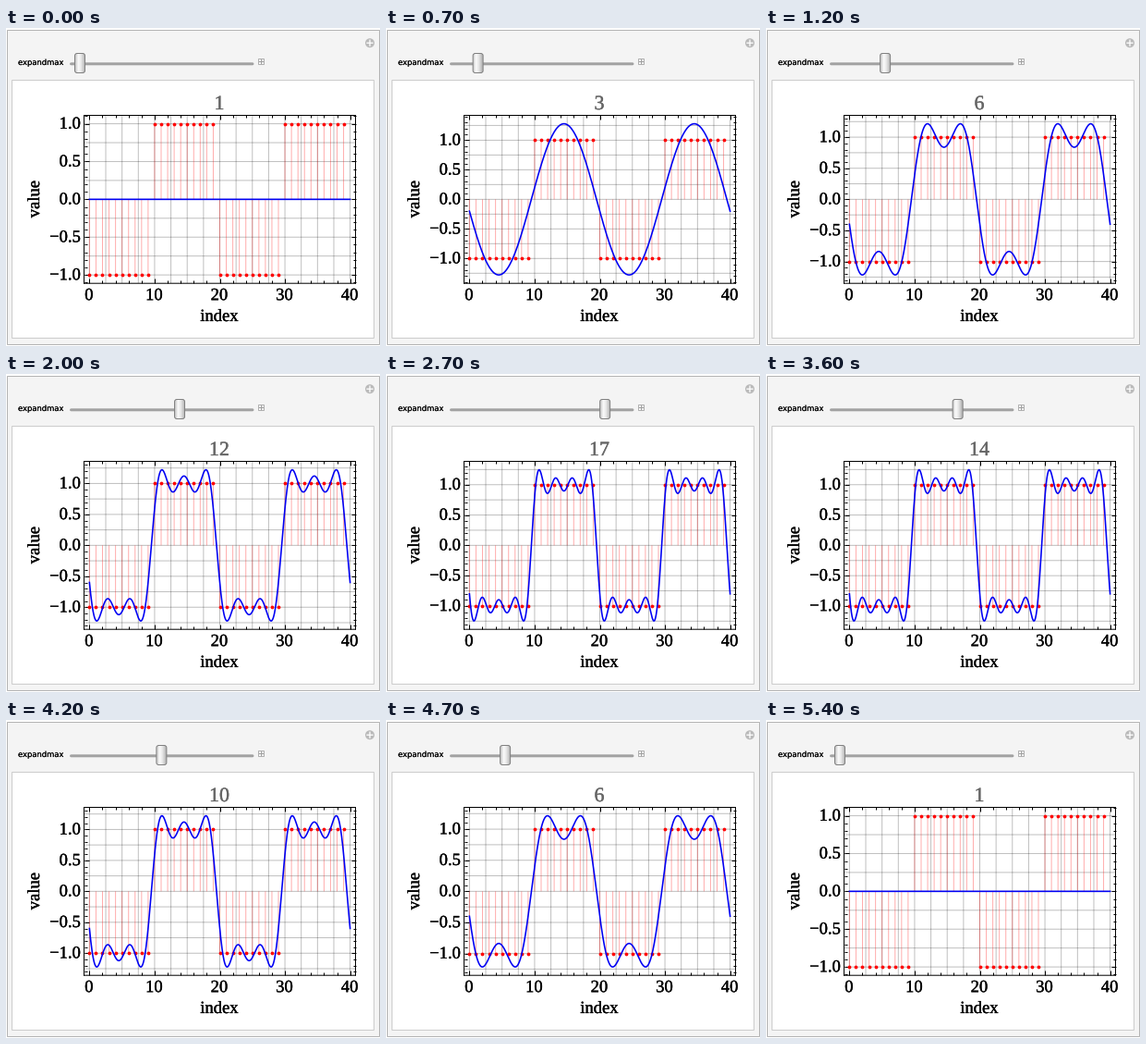
These frames come from a looping animation (405 by 344 pixels, 6000 ms). A matplotlib script:

```python
import numpy as np
import matplotlib.pyplot as plt
from matplotlib.animation import FuncAnimation
from matplotlib.patches import Circle, FancyBboxPatch, Rectangle
from matplotlib.patheffects import withStroke
from matplotlib.ticker import MultipleLocator

W, H, DPI = 405, 344, 100
FRAMES, INTERVAL = 60, 100
PX = 72 / DPI  # points per pixel
SERIF, SANS = "Liberation Serif", "DejaVu Sans"

plt.rcParams["path.snap"] = False
fig = plt.figure(figsize=(W / DPI, H / DPI), dpi=DPI, facecolor="white")
panel = fig.add_axes([0, 0, 1, 1])
panel.set(xlim=(0, W), ylim=(H, 0))
panel.axis("off")


def box(x0, y0, x1, y1, face, edge):
    panel.add_patch(Rectangle((x0, y0), x1 - x0, y1 - y0, fc=face, ec=edge, lw=PX))


def stroke(xs, ys, color, width=1, **kw):
    panel.plot(xs, ys, color=color, lw=width * PX, **kw)


def font(size, family=SERIF, color="black", weight=0.35):
    """Text style with slightly thickened strokes."""
    return dict(fontsize=size * PX, family=family, color=color, va="baseline",
                path_effects=[withStroke(linewidth=weight * PX, foreground=color)])


def plus(x, y, arm, color, width=1):
    stroke([x - arm, x + arm], [y, y], color, width)
    stroke([x, x], [y - arm, y + arm], color, width)


# Control panel
box(1.5, 2.5, 404.5, 342.5, "#f4f4f4", "#b4b4b4")
box(6.5, 56.5, 398.5, 335.5, "white", "#cccccc")
panel.add_patch(Circle((394, 16.2), 5, fc="#bababa", ec="none"))
plus(394, 16.2, 3, "white", 1.3)
panel.text(13, 40, "expandmax", **font(8.4, SANS, weight=0.1))
stroke([70.5, 267], [38.8, 38.8], "#a2a2a2", 3, solid_capstyle="round")
box(273.5, 33.5, 279.5, 39.5, "#f8f8f8", "#b0b0b0")
plus(276.5, 36.5, 2, "#a0a0a0")

# Slider thumb
thumb = FancyBboxPatch((0, 0), 1, 1, boxstyle="round,pad=0,rounding_size=2.5",
                       fc="none", ec="#808080", lw=PX, zorder=6)
panel.add_patch(thumb)
shade = np.interp(np.linspace(0, 1, 24), [0, 0.3, 0.6, 1], [0.78, 0.98, 0.9, 0.68])
shine = panel.imshow(shade[None, :], cmap="gray", vmin=0, vmax=1, aspect="auto",
                     zorder=5, extent=(74, 86, 49, 27))
panel.set(xlim=(0, W), ylim=(H, 0))

# Plot area
LEFT, TOP, WIDTH = 84.5, 94.5, 294
HEIGHT = WIDTH * 2 / (1 + 5 ** 0.5)
ax = fig.add_axes([LEFT / W, 1 - (TOP + HEIGHT) / H, WIDTH / W, HEIGHT / H])
ax.patch.set_visible(False)
pad = 40 * 0.02 / 0.96
ax.set_xlim(-pad, 40 + pad)
for spine in ax.spines.values():
    spine.set(linewidth=PX, color="black")

ax.xaxis.set_major_locator(MultipleLocator(10))
ax.xaxis.set_minor_locator(MultipleLocator(2))
ax.yaxis.set_major_locator(MultipleLocator(0.5))
ax.yaxis.set_minor_locator(MultipleLocator(0.1))
ax.tick_params(which="both", direction="in", top=True, right=True, width=PX,
               labelleft=False, labelbottom=False)
ax.tick_params(which="major", length=5 * PX)
ax.tick_params(which="minor", length=3 * PX)


def tick_label(s, xy, coords, dx, dy, ha):
    ax.annotate(s, xy, xycoords=coords, xytext=(dx * PX, dy * PX), ha=ha,
                textcoords="offset points", annotation_clip=False, **font(18.6))


for x in range(0, 41, 10):
    tick_label(str(x), (x, 0), ("data", "axes fraction"), -0.5, -18, "center")
for y in np.arange(-1, 1.1, 0.5):
    tick_label(f"{y:.1f}".replace("-", "\u2212"), (0, y),
               ("axes fraction", "data"), -3.4, -5.2, "right")

grid = dict(color="black", alpha=0.25, lw=PX, zorder=0.5)
for x in np.arange(0, 40.1, 2.5):
    ax.axvline(x, **grid)
for y in np.arange(-1.25, 1.3, 0.25):
    ax.axhline(y, **grid)

index = np.arange(40)
value = np.where(index // 10 % 2, 1, -1)
ax.vlines(index, 0, value, color="red", alpha=0.32, lw=PX, zorder=2)
ax.plot(index, value, "o", color="red", ms=3.8 * PX, mew=0, zorder=3)
t = np.linspace(0, 40, 801)
curve, = ax.plot(t, 0 * t, color="#0000f4", lw=1.6 * PX, zorder=4)

panel.text(231, 317, "index", ha="center", **font(18.6))
panel.text(36, 185, "value", ha="center", rotation=90, rotation_mode="anchor",
           **font(18.6))
title = panel.text(231, 88, "", ha="center", **font(22, color="#666666"))


def partial_sum(n):
    """Square wave rebuilt from its discrete harmonics up to n."""
    odd = np.arange(1, n // 2 + 1, 2)[:, None]
    terms = np.sin(np.pi * odd * (t + 0.5) / 10) / np.sin(np.pi * odd / 20)
    return -0.2 * terms.sum(axis=0)


def draw(frame):
    step = min(frame, FRAMES - 1 - frame)
    n = max(1, int((step - 5.62) // 1.36) + 2)
    wave = partial_sum(n)
    curve.set_ydata(wave)
    half = max(1, np.abs(wave).max()) / 0.9
    ax.set_ylim(-half, half)
    title.set_text(str(n))
    x = 80 + 9.82 * (n - 1)
    thumb.set_bounds(x - 5.5, 27.5, 11, 21)
    shine.set_extent((x - 5.5, x + 5.5, 48.5, 27.5))
    shine.set_clip_path(thumb)
    panel.set(xlim=(0, W), ylim=(H, 0))
    return curve, title, thumb, shine


anim = FuncAnimation(fig, draw, frames=FRAMES, interval=INTERVAL,
                     repeat=True, repeat_delay=0, blit=False)
plt.show()
```
